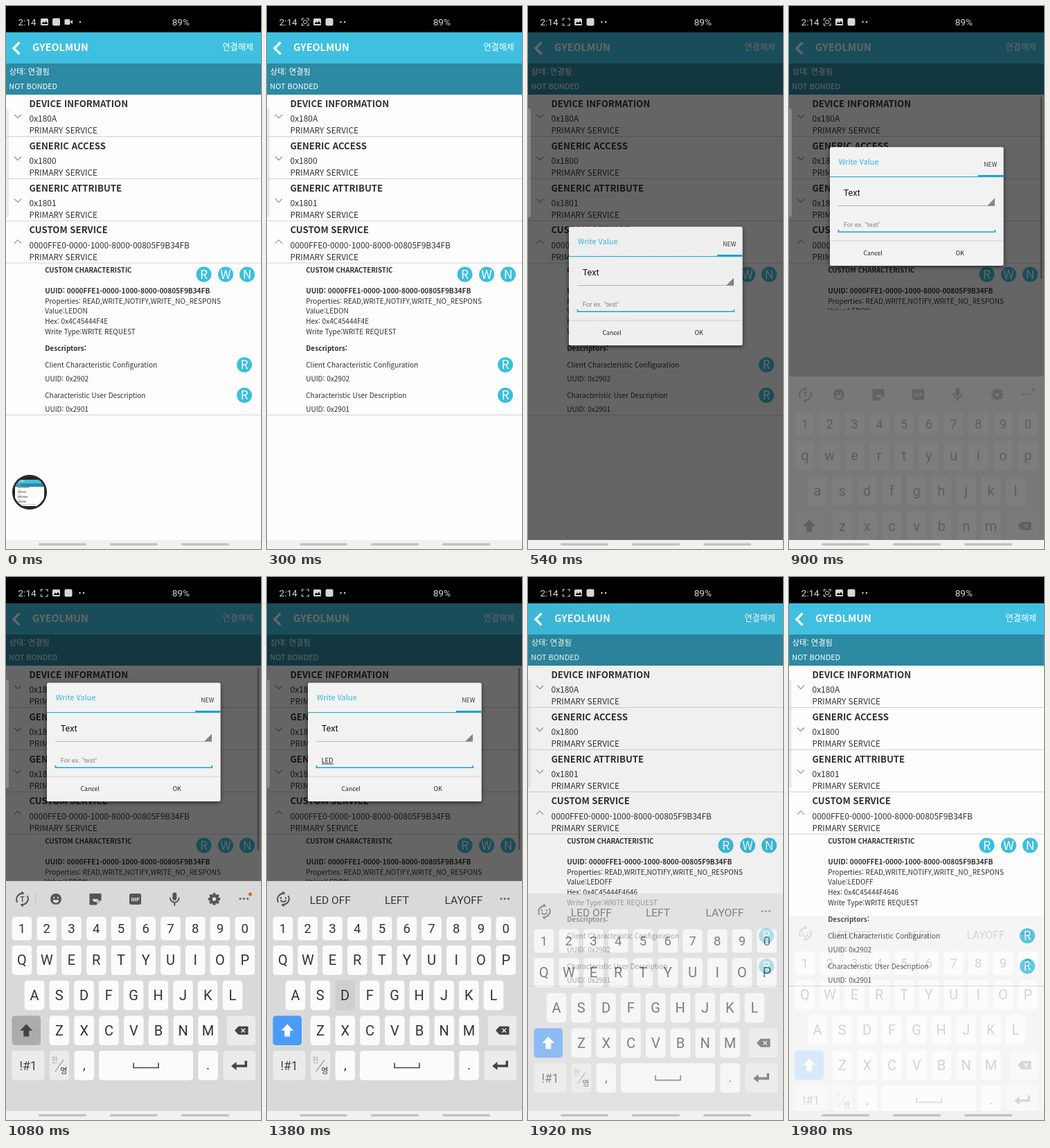
Write an HTML page that moves like this. It is 368 px wide and 784 px high and loops after 2040 ms.

```html
<!DOCTYPE html>
<html lang="ko">
<head>
<meta charset="utf-8">
<title>BLE write value</title>
<style>
html, body { margin: 0; width: 100%; height: 100%; overflow: hidden; background: #000; }
svg { display: block; width: 368px; height: 784px; }
text {
  font-family: "Noto Sans CJK KR", "Noto Sans CJK", "Noto Sans CJK JP", sans-serif;
  font-feature-settings: "calt" 0; white-space: pre;
}
.r { font-family: Roboto, "Noto Sans", sans-serif; }
.b { font-weight: 700; }
.m { text-anchor: middle; }
.line { fill: none; stroke: #555; stroke-width: 2; stroke-linecap: round; stroke-linejoin: round; }
</style>
</head>
<body>
<svg id="stage" viewBox="0 0 368 784"></svg>
<script>
const LOOP = 2040, STEP = 60;
const stage = document.getElementById('stage');
const $ = id => document.getElementById(id);

const txt = (x, y, size, fill, s, cls = '', id = '') =>
  `<text x="${x}" y="${y}" font-size="${size}" fill="${fill}" class="${cls}"${id && ` id="${id}"`}>${s}</text>`;
const rect = (x, y, w, h, fill, rx = 0, more = '') =>
  `<rect x="${x}" y="${y}" width="${w}" height="${h}" fill="${fill}" rx="${rx}" ${more}/>`;
const path = (d, more = '') => `<path d="${d}" ${more}/>`;
const dot = (x, y, r, fill) => `<circle cx="${x}" cy="${y}" r="${r}" fill="${fill}"/>`;

// ---- status bar -------------------------------------------------------
const GREY = '#d6d6d6';
const photo = x => rect(x - 5.5, 18, 11, 10, GREY, 1.5) +
  path(`M${x - 4} 26l2.5-3.5 2 2 2-3 2.5 4.5z`, 'fill="#000"');
const badge = x => rect(x - 5.5, 17.5, 11, 11, GREY, 2.5);

function statusBar() {
  const camera = rect(84.5, 19, 8, 8, GREY, 1.5) + path('M92.5 23l3.5-3v6z', `fill="${GREY}"`);
  const scan = path('M50.5 21v-3h3M57 18h3v3M60 25v3h-3M53.5 28h-3v-3',
    `fill="none" stroke="${GREY}" stroke-width="1.1"`);
  return rect(0, 0, 368, 38, '#000') +
    txt(17.5, 28, 13.6, GREY, '2:14', 'r') + txt(239.7, 28, 13.6, GREY, '89%', 'r') +
    `<g id="icons1">${photo(55.5)}${badge(72.5)}${camera}${dot(107, 23, 1.2, GREY)}</g>` +
    `<g id="icons2">${scan}<g id="scanCore">${rect(52.7, 20.7, 5, 4.6, 'none', 1, `stroke="${GREY}"`)}</g>` +
    `${photo(72.5)}${badge(90)}${dot(106.5, 23, 1.2, GREY)}${dot(112, 23, 1.2, GREY)}</g>`;
}

// ---- service list -----------------------------------------------------
const INK = '#303030';
const roundButton = (x, y, s) => dot(x, y, 11, '#3cbedd') + txt(x, y + 6.4, 17.5, '#fff', s, 'm');

function services() {
  const rows = [['DEVICE INFORMATION', '0x180A'], ['GENERIC ACCESS', '0x1800'],
    ['GENERIC ATTRIBUTE', '0x1801'], ['CUSTOM SERVICE', '0000FFE0-0000-1000-8000-00805F9B34FB']];
  return rows.map(([name, code], i) => {
    const y = 128 + i * 60.85, open = i === 3;
    const arrow = open ? `M12 ${y + 32.3}l5-5 5 5` : `M12 ${y + 28.7}l5 5 5-5`;
    return txt(33.4, y + 17.8, 13.2, INK, name, 'b') + txt(33.5, y + 39.2, 11.95, INK, code) +
      txt(33.4, y + 56.3, 11.8, INK, 'PRIMARY SERVICE') +
      path(arrow, 'fill="none" stroke="#999" stroke-width="1.3"') +
      rect(0, y + 60, 368, 1, '#d2d2d2');
  }).join('');
}

function details() {
  const lines = [
    [414.5, 'UUID: 0000FFE1-0000-1000-8000-00805F9B34FB', 'b'],
    [429.5, 'Properties: READ,WRITE,NOTIFY,WRITE_NO_RESPONS'],
    [444, '', '', 'value'], [459, '', '', 'hex'],
    [473.5, 'Write Type:WRITE REQUEST'], [497.7, 'Descriptors:', 'b'],
    [521.7, 'Client Characteristic Configuration'], [542.2, 'UUID: 0x2902'],
    [565.5, 'Characteristic User Description'], [586, 'UUID: 0x2901']];
  return txt(56.2, 385.4, 9.7, INK, 'CUSTOM CHARACTERISTIC', 'b') +
    lines.map(([y, s, cls, id]) => txt(56.2, y, 10.05, INK, s, cls, id)).join('') +
    [[285.5, 387.5, 'R'], [317, 387.5, 'W'], [348, 387.5, 'N'], [344, 518, 'R'], [344, 562, 'R']]
      .map(a => roundButton(...a)).join('') +
    rect(0, 590, 368, 1, '#d2d2d2');
}

const app = () => rect(0, 38, 368, 733, '#fdfdfd') +
  `<g clip-path="url(#fold)">${services()}${details()}</g>` +
  rect(0, 38, 368, 45, '#3fc0e0') + rect(0, 83, 368, 45, '#2c8aa2') +
  path('M19.5 52.5l-8.5 8.5 8.5 8.5', 'fill="none" stroke="#fff" stroke-width="3.4"') +
  txt(38, 65.3, 14.4, '#fff', 'GYEOLMUN', 'b') + txt(312.4, 64.3, 12.1, '#fff', '연결해제') +
  txt(4.7, 99.3, 11.3, '#fff', '상태: 연결됨') + txt(4.3, 120, 10.9, '#fff', 'NOT BONDED');

const bubble = () => `<g id="bubble">${dot(34, 702, 25, '#222')}
  <g clip-path="url(#lens)">
  <use href="#app" transform="translate(13 679.6) scale(.115)" clip-path="url(#crop)"/></g>
  <circle cx="34" cy="702" r="23.5" fill="none" stroke="#2a2a2a" stroke-width="2.5"/></g>`;

// ---- dialog -----------------------------------------------------------
const BLUE = '#17a5cc';
function dialog() {
  return rect(59, 318.7, 250.5, 171.3, '#f2f2f2', 2, 'filter="url(#shade)"') +
    txt(71.8, 343.7, 10.9, '#33b5dc', 'Write Value') +
    txt(281.3, 347, 8.7, '#333', 'NEW') +
    rect(59, 361, 250.5, 1.2, '#35aeca') + rect(273, 359, 36.5, 3, '#1ba6c8') +
    txt(78.7, 389.3, 12.6, '#111', 'Text', 'r') +
    rect(71, 403, 226, 1, '#b4b4b4') + path('M297 392.5v11h-11z', 'fill="#858585"') +
    txt(78.7, 433.9, 9.5, '#858585', 'For ex. "test"', 'r', 'hint') +
    txt(78.7, 433.9, 9.5, '#222', '', 'r', 'entry') +
    rect(79, 435.3, 0, 1, '#222', 0, 'id="entryLine"') +
    rect(80, 423, 1, 14, '#333', 0, 'id="caret"') +
    path('M71.5 438v3.3h225.8v-3.3', `fill="none" stroke="${BLUE}" stroke-width="1.6"`) +
    rect(184.5, 455, 125, 35, '#33b5e5', 0, 'id="okGlow"') +
    rect(59, 453.5, 250.5, 1, '#d4d4d4') +
    txt(121.2, 475.2, 8.7, '#222', 'Cancel', 'm') + txt(246.7, 475.2, 8.8, '#222', 'OK', 'm');
}

// ---- keyboard ---------------------------------------------------------
const PITCH = 35.75, CAP = '#fbfbfb', SIDE = '#ebebeb';
const key = (x, y, w, h, fill = CAP, id = '') => rect(x, y, w, h, fill, 4.5, id && `id="${id}"`);
const keyRow = (chars, x0, y, h, size) => [...chars].map((c, i) => {
  const x = x0 + i * PITCH, cls = /[A-Z]/.test(c) ? 'r m letter' : 'r m';
  return key(x - 14.3, y - h / 2, 28.6, h, CAP, 'key' + c) + txt(x, y + size * .355, size, '#333', c, cls);
}).join('');

const cycle = path('M16 469a8.5 8.5 0 0 1 9-12l-2-2M31 461a8.5 8.5 0 0 1-9 12l2 2',
  'class="line" stroke-width="1.6"');
const more = [338, 343.3, 348.6].map(x => dot(x, 464.5, 1.6, '#666')).join('');
const face = (x, y, r) => dot(x, y, r, '#555') +
  dot(x - r * .35, y - r * .25, r * .15, '#dcdcdc') + dot(x + r * .35, y - r * .25, r * .15, '#dcdcdc') +
  path(`M${x - r * .55} ${y + r * .15}a${r * .55} ${r * .55} 0 0 0 ${r * 1.1} 0z`, 'fill="#dcdcdc"');

function gear(x, y) {
  const teeth = [0, 45, 90, 135].map(a =>
    rect(x - 2, y - 8.7, 4, 17.4, '#555', 1, `transform="rotate(${a} ${x} ${y})"`)).join('');
  return teeth + dot(x, y, 6.6, '#555') + dot(x, y, 2.7, '#dcdcdc');
}

function toolbar() {
  return `<g id="tools">${cycle}${txt(23.5, 468.7, 10, '#555', 'T', 'r m b')}` +
    rect(42, 456, 1, 18, '#c2c2c2') + face(72, 465, 8) +
    path('M121 457.5h16v9l-6.5 6.5h-9.5z', 'fill="#555" stroke="#555" stroke-linejoin="round"') +
    path('M125 465a4 4 0 0 0 8 0zM131 472v-5h5z', 'fill="#dcdcdc"') +
    rect(178, 457, 17, 16, '#555', 2.5) + txt(186.5, 468, 8, '#eee', 'GIF', 'r m b') +
    rect(240.3, 455.5, 6, 11.5, '#555', 3) + path('M237 463.5a6.3 6.3 0 0 0 12.6 0M243.3 470v4', 'class="line"') +
    gear(300.5, 465) + dot(352.5, 458, 2.6, '#e8641e') + '</g>' +
    `<g id="words">${cycle}${path('M20 464v-1M27 464v-1M20 467a4 4 0 0 0 7 0', 'class="line" stroke-width="1.3"')}` +
    [['LED OFF', 91.3], ['LEFT', 187.5], ['LAYOFF', 284]]
      .map(([s, x]) => txt(x, 471.6, 15.5, '#333', s, 'r m')).join('') + '</g>' + more;
}

function keyboard() {
  return rect(0, 439, 368, 345, '#d9d9da') + toolbar() +
    keyRow('1234567890', 23, 507.5, 34, 18.5) +
    keyRow('QWERTYUIOP', 23, 553.3, 42.5, 20) +
    keyRow('ASDFGHJKL', 41, 604, 42.5, 20) +
    keyRow('ZXCVBNM', 77, 654.7, 42.5, 20) +
    key(8.5, 633.5, 41.5, 42.5, SIDE, 'shift') +
    path('M29.3 645.5l9 9.5h-5v8.5h-8v-8.5h-5z', 'id="arrow" fill="#444"') +
    key(318.7, 633.5, 41.5, 42.5, SIDE) +
    path('M330 654.7l5.5-6h14v12h-14z', 'fill="#444"') +
    path('M339.5 652l5.5 5.5m0-5.5l-5.5 5.5', 'stroke="#eee" stroke-width="1.5"') +
    key(8.5, 684, 47, 42.5, SIDE) + txt(32, 711.5, 17.5, '#444', '!#1', 'r m') +
    key(62.7, 684, 28.6, 42.5, SIDE) + txt(70, 701, 10, '#a5a5a5', '한', 'm') +
    path('M71 714l12-17', 'stroke="#777"') + txt(83.3, 716.5, 11, '#333', '영', 'm') +
    key(98.5, 684, 28.6, 42.5) + txt(112.8, 711, 19, '#333', ',', 'r m') +
    key(134, 684, 136, 42.5) + path('M184 701.5v7h36v-7', 'fill="none" stroke="#444" stroke-width="1.6"') +
    key(277.3, 684, 28.6, 42.5) + txt(291.6, 711, 19, '#333', '.', 'r m') +
    key(313.5, 684, 46.7, 42.5, SIDE) +
    path('M325 706l7.5-6v4.3h12v-5.8h3.5v9.2h-15.5v4.3z', 'fill="#444"');
}

// ---- scene ------------------------------------------------------------
stage.innerHTML = `<defs>
  <clipPath id="fold"><rect id="foldBox" y="38" width="368" height="733"/></clipPath>
  <clipPath id="lens"><circle cx="34" cy="702" r="23"/></clipPath>
  <clipPath id="crop"><rect width="368" height="368"/></clipPath>
  <filter id="shade" x="-10%" y="-10%" width="120%" height="125%">
    <feDropShadow dx="0" dy="2" stdDeviation="3" flood-opacity=".6"/></filter>
  </defs>
  <g id="app">${app()}</g>
  ${rect(362.7, 131, 2.6, 263, '#777', 0, 'id="scroll" opacity=".6"')}
  ${bubble()}
  ${rect(0, 38, 368, 733, '#000', 0, 'id="dim"')}
  <g id="keys">${keyboard()}</g>
  <g id="dialog">${dialog()}</g>
  ${rect(-6, 148, 10, 157, '#c8c8c8', 3, 'opacity=".35"')}
  ${statusBar()}
  ${rect(0, 771, 368, 13, '#f1f1f1')}
  ${[47, 150, 253].map(x => rect(x, 775.5, 69, 3.4, '#c3c3c3', 1.7)).join('')}`;

// ---- motion: [time, value] pairs --------------------------------------
const TRACKS = {
  bubble: [[0, 1], [60, .6], [120, .2], [180, 0]],
  dim: [[360, 0], [420, .14], [480, .4], [540, .6], [1740, .6], [1800, .42], [1860, .22], [1920, .05], [1980, 0]],
  fade: [[300, 0], [360, .4], [420, .86], [480, .95], [540, .98], [600, 1], [1740, 1], [1800, .6], [1860, .15], [1920, 0]],
  scale: [[300, .9], [360, .95], [420, .985], [480, 1]],
  lift: [[720, 0], [780, 12], [840, 60], [900, 115], [960, 148], [1020, 163], [1080, 166]],
  slide: [[720, 260], [780, 210], [840, 150], [900, 96], [960, 48], [1020, 14], [1080, 0], [1860, 0], [1920, 18], [1980, 50]],
  keys: [[780, 0], [840, .05], [900, .16], [960, .48], [1020, .85], [1080, 1], [1860, 1], [1920, .6], [1980, .2]]
};
function at(track, t) {
  const i = track.findIndex(p => p[0] > t);
  if (i === 0) return track[0][1];
  if (i < 0) return track[track.length - 1][1];
  const [t0, a] = track[i - 1], [t1, b] = track[i];
  return a + (b - a) * (t - t0) / (t1 - t0);
}

const WORD = 'LEDOFF', TYPE_START = 1260;
const letters = [...document.querySelectorAll('.letter')];
const set = (id, name, v) => $(id).setAttribute(name, v);
const show = (id, on) => set(id, 'visibility', on ? 'visible' : 'hidden');
const put = (id, s) => { $(id).textContent = s; };

function draw(t) {
  const v = {};
  for (const k in TRACKS) v[k] = at(TRACKS[k], t);
  const within = (a, b) => t >= a && t < b;

  set('bubble', 'opacity', v.bubble);
  set('dim', 'opacity', v.dim);
  set('dialog', 'opacity', v.fade);
  set('dialog', 'transform',
    `translate(184.3 ${404.3 - v.lift}) scale(${v.scale}) translate(-184.3 -404.3)`);
  set('keys', 'opacity', v.keys);
  set('keys', 'transform', `translate(0 ${v.slide})`);

  const folded = within(780, 1860);
  set('foldBox', 'height', folded ? 401 : 733);
  show('scroll', folded);

  const sent = t >= 1860;
  put('value', sent ? 'Value:LEDOFF' : 'Value:LEDON');
  put('hex', sent ? 'Hex: 0x4C45444F4646' : 'Hex: 0x4C45444F4E');

  const typed = Math.max(0, Math.min(WORD.length, Math.floor((t - TYPE_START) / STEP) + 1));
  put('entry', WORD.slice(0, typed));
  set('entryLine', 'width', typed ? $('entry').getComputedTextLength() : 0);
  show('hint', !typed);
  show('caret', within(360, 480));
  set('okGlow', 'opacity', within(1740, 1860) ? .35 : 0);

  show('tools', !typed);
  show('words', typed);
  const upper = t >= 1020, caps = t >= 1200;
  letters.forEach(el => {
    const s = el.textContent;
    el.textContent = upper ? s.toUpperCase() : s.toLowerCase();
  });
  set('shift', 'fill', caps ? '#4a9bf8' : upper ? '#acacac' : SIDE);
  set('arrow', 'fill', caps ? '#fff' : '#444');
  const pressed = typed && t < TYPE_START + WORD.length * STEP ? WORD[typed - 1] : '';
  for (const c of new Set(WORD)) set('key' + c, 'fill', c === pressed ? '#cfcfcf' : CAP);

  show('icons1', t < STEP);
  show('icons2', t >= STEP);
  const phase = t % 420;
  show('scanCore', t >= STEP && (phase < 90 || phase > 260));
}

const start = performance.now();
function tick() {
  const t = (performance.now() - start) % LOOP;
  draw(Math.floor(t / STEP) * STEP);
  requestAnimationFrame(tick);
}
draw(0);
requestAnimationFrame(tick);
</script>
</body>
</html>
```
